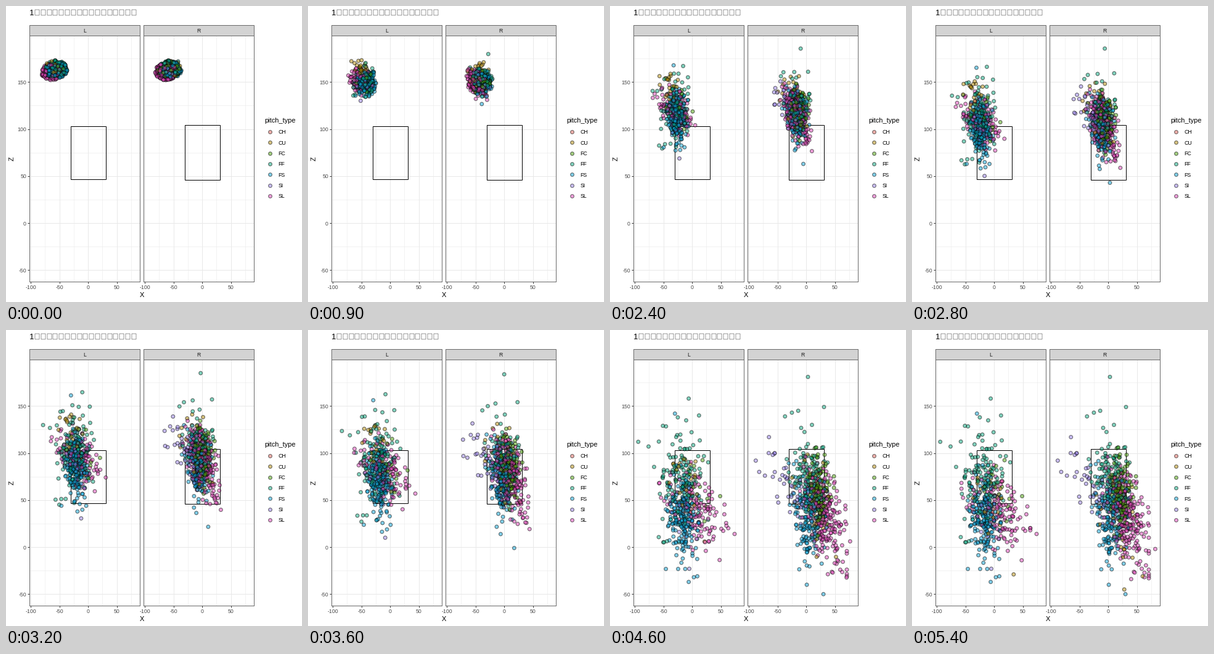
These frames come from a looping animation (480 px wide and 480 px high, 5.5 s). A matplotlib script:

```python
import numpy as np
import matplotlib.pyplot as plt
from matplotlib.animation import FuncAnimation
from matplotlib.colors import to_rgba
from matplotlib.patches import Rectangle

SIZE, DPI = 480, 72          # at 72 dpi one point is one pixel
FRAMES, INTERVAL = 55, 100
STEP = 0.01                  # seconds of ball flight per frame
BORDER = "#6A6A6A"

plt.rcParams["font.family"] = "Liberation Sans"
rng = np.random.default_rng(11)

# colour, release x and z (cm), acceleration x and z (cm/s^2),
# flight time (s), correlation of x and z at the plate
TYPES = {
    "CH": ("#E8695F", -56, 162, -350, -750, 0.455, 0),
    "CU": ("#B88F08", -57, 165, 200, -1100, 0.505, -0.4),
    "FC": ("#4FA808", -58, 163, 0, -620, 0.435, 0),
    "FF": ("#08AE84", -56, 164, -300, -400, 0.42, 0),
    "FS": ("#08A6DC", -55, 163, -300, -800, 0.452, 0),
    "SI": ("#9A82F0", -60, 162, -600, -600, 0.43, -0.5),
    "SL": ("#E846BE", -63, 161, 150, -850, 0.462, -0.45),
}

# count, mean x, mean z, spread x, spread z at the plate
GROUPS = {
    "L": {
        "CH": (3, -15, 45, 10, 15),
        "CU": (20, -2, 48, 18, 24),
        "FC": (16, 8, 66, 17, 20),
        "FF": (125, -20, 70, 20, 27),
        "FS": (200, -17, 32, 12, 23),
        "SI": (4, -22, 45, 8, 18),
        "SL": (130, 3, 41, 25, 21),
    },
    "R": {
        "CH": (3, 0, 40, 10, 15),
        "CU": (22, 22, 26, 18, 28),
        "FC": (125, 22, 58, 11, 20),
        "FF": (100, 2, 74, 15, 22),
        "FS": (170, 3, 34, 14, 24),
        "SI": (32, -27, 57, 16, 17),
        "SL": (250, 30, 32, 17, 23),
    },
}

# stray pitches: type and place at the plate
STRAYS = {
    "L": [("FF", -94, 112), ("FF", -76, 107), ("FF", -51, 129),
          ("FF", -6, 158), ("FF", -25, 138), ("FF", 12, 140),
          ("FS", -30, 142), ("FS", -6, -37), ("FS", 3, -32),
          ("FS", 9, -31), ("SI", -5, -23), ("SL", 74, 14),
          ("SL", 48, -14), ("CU", 34, -29)],
    "R": [("FF", 3, 181), ("FF", 31, 149), ("FF", -14, 145),
          ("FF", -37, 139), ("FF", -25, 143), ("FF", 10, 130),
          ("FS", 30, -50), ("FS", 1, -40), ("SI", -88, 92),
          ("SI", -65, 117), ("SI", -82, 80), ("SI", -72, 76),
          ("SI", -55, 100), ("SL", 82, -2), ("SL", 63, -32),
          ("SL", 40, -34), ("CU", 28, -45), ("CU", 60, -31)],
}

# left edge of each panel and its strike zone (x, z, width, height)
PANELS = {
    "L": (38, (-30.3, 46.5, 60.8, 56.4)),
    "R": (223, (-30.3, 46.2, 60.8, 58)),
}
PANEL_W, STRIP_TOP, PANEL_TOP, PANEL_BOTTOM = 179, 31, 48, 447
X_SCALE, Z_SCALE, X_ZERO, Z_ZERO = 0.93, 1.525, 95.2, 352.1


def clipped(n, limit):
    return np.clip(rng.normal(size=n), -limit, limit)


def plate_points(group, rho):
    n, mx, mz, sx, sz = group
    u, v = clipped(n, 2.4), clipped(n, 2.4)
    return np.column_stack([
        mx + sx * u,
        mz + sz * (rho * u + np.sqrt(1 - rho**2) * v)])


def release_points(n, x, z):
    """Fill an ellipse around the release point evenly."""
    r, a = np.sqrt(rng.random(n)), rng.uniform(0, 2 * np.pi, n)
    return np.column_stack([x + 19 * r * np.cos(a), z + 9 * r * np.sin(a)])


def make_pitches(side):
    """Return start, end, bow, flight time and colour of every pitch."""
    parts = []
    for name, (color, x0, z0, ax, az, flight, rho) in TYPES.items():
        end = plate_points(GROUPS[side][name], rho)
        stray = [s[1:] for s in STRAYS[side] if s[0] == name]
        if stray:
            end = np.vstack([end, stray])
        n = len(end)
        start = release_points(n, x0, z0)
        # the highest pitch leaves from the top right of the cluster
        if end[:, 1].max() > 170:
            start[end[:, 1].argmax()] = -42, 172
        time = flight + 0.009 * clipped(n, 1.5)
        bow = 0.5 * np.array([ax, az]) * time[:, None] ** 2
        fill = np.tile(to_rgba(color, 0.5), (n, 1))
        parts.append((start, end, bow, time, fill))
    columns = [np.concatenate(c) for c in zip(*parts)]
    order = rng.permutation(len(columns[0]))
    return [c[order] for c in columns]


def positions(pitches, t):
    start, end, bow, time, _ = pitches
    s = np.minimum(t / time, 1)[:, None]
    return start + (end - start) * s + bow * (s * s - s)


def dots(ax, x, y, fill):
    return ax.scatter(x, y, s=5.7**2, c=fill, edgecolors=(0, 0, 0, 0.5),
                      linewidths=1.2, zorder=3)


def text(x, y, label, size=8.8, color="black", ha="left", **kw):
    kw.setdefault("va", "baseline")
    page.text(x, y, label, fontsize=size, color=color, ha=ha, **kw)


fig = plt.figure(figsize=(SIZE / DPI, SIZE / DPI), dpi=DPI, facecolor="white")

page = fig.add_axes([0, 0, 1, 1])
page.set(xlim=(0, SIZE), ylim=(SIZE, 0))
page.axis("off")


def make_panel(side):
    left, zone = PANELS[side]
    ax = fig.add_axes([left / SIZE, 1 - PANEL_BOTTOM / SIZE, PANEL_W / SIZE,
                       (PANEL_BOTTOM - PANEL_TOP) / SIZE])
    ax.set_xlim(-X_ZERO / X_SCALE, (PANEL_W - X_ZERO) / X_SCALE)
    ax.set_ylim((Z_ZERO - PANEL_BOTTOM) / Z_SCALE,
                (Z_ZERO - PANEL_TOP) / Z_SCALE)
    ax.set_xticks([-100, -50, 0, 50])
    ax.set_xticks([-75, -25, 25, 75], minor=True)
    ax.set_yticks(range(-50, 151, 50))
    ax.set_yticks(range(-25, 176, 50), minor=True)
    ax.set_axisbelow(True)
    ax.grid(which="major", color="#E8E8E8", lw=1)
    ax.grid(which="minor", color="#EBEBEB", lw=0.6)
    ax.tick_params(which="major", length=3, width=1, color="#333333",
                   labelbottom=False, labelleft=False, left=side == "L")
    ax.tick_params(which="minor", length=0)
    for spine in ax.spines.values():
        spine.set(color=BORDER, linewidth=1)

    page.add_patch(Rectangle((left, STRIP_TOP), PANEL_W,
                             PANEL_TOP - STRIP_TOP,
                             fc="#D3D3D3", ec=BORDER, lw=1))
    text(left + PANEL_W / 2, 43, side, color="#1A1A1A", ha="center")
    for x in (-100, -50, 0, 50):
        text(left + X_ZERO + x * X_SCALE, 459, str(x), color="#4D4D4D",
             ha="center")

    ax.add_patch(Rectangle(zone[:2], *zone[2:], fill=False, ec="black",
                           lw=1, zorder=2))
    pitches = make_pitches(side)
    start = positions(pitches, 0)
    return dots(ax, start[:, 0], start[:, 1], pitches[4]), pitches


panels = [make_panel(side) for side in PANELS]

# title: a digit followed by empty glyph boxes
text(38, 14.6, "1", size=13.2)
for i in range(17):
    page.add_patch(Rectangle((47 + 9.8 * i, 6), 7, 9, fill=False,
                             ec="black", lw=0.4))

for z in range(-50, 151, 50):
    text(33, Z_ZERO - z * Z_SCALE + 3.4, str(z), color="#4D4D4D", ha="right")
text(220.3, 472, "X", size=11, ha="center")
text(10, 248, "Z", size=11, ha="center", va="center", rotation=90)

text(418.8, 188.8, "pitch_type", size=11)
for i, (name, spec) in enumerate(TYPES.items()):
    y = 204.2 + 17.28 * i
    dots(page, [427.5], [y], [to_rgba(spec[0], 0.5)])
    text(441.3, y + 3.2, name)


def update(frame):
    for cloud, pitches in panels:
        cloud.set_offsets(positions(pitches, frame * STEP))
    return [cloud for cloud, _ in panels]


anim = FuncAnimation(fig, update, frames=FRAMES, interval=INTERVAL,
                     repeat=True, repeat_delay=0, blit=False)
plt.show()
```
